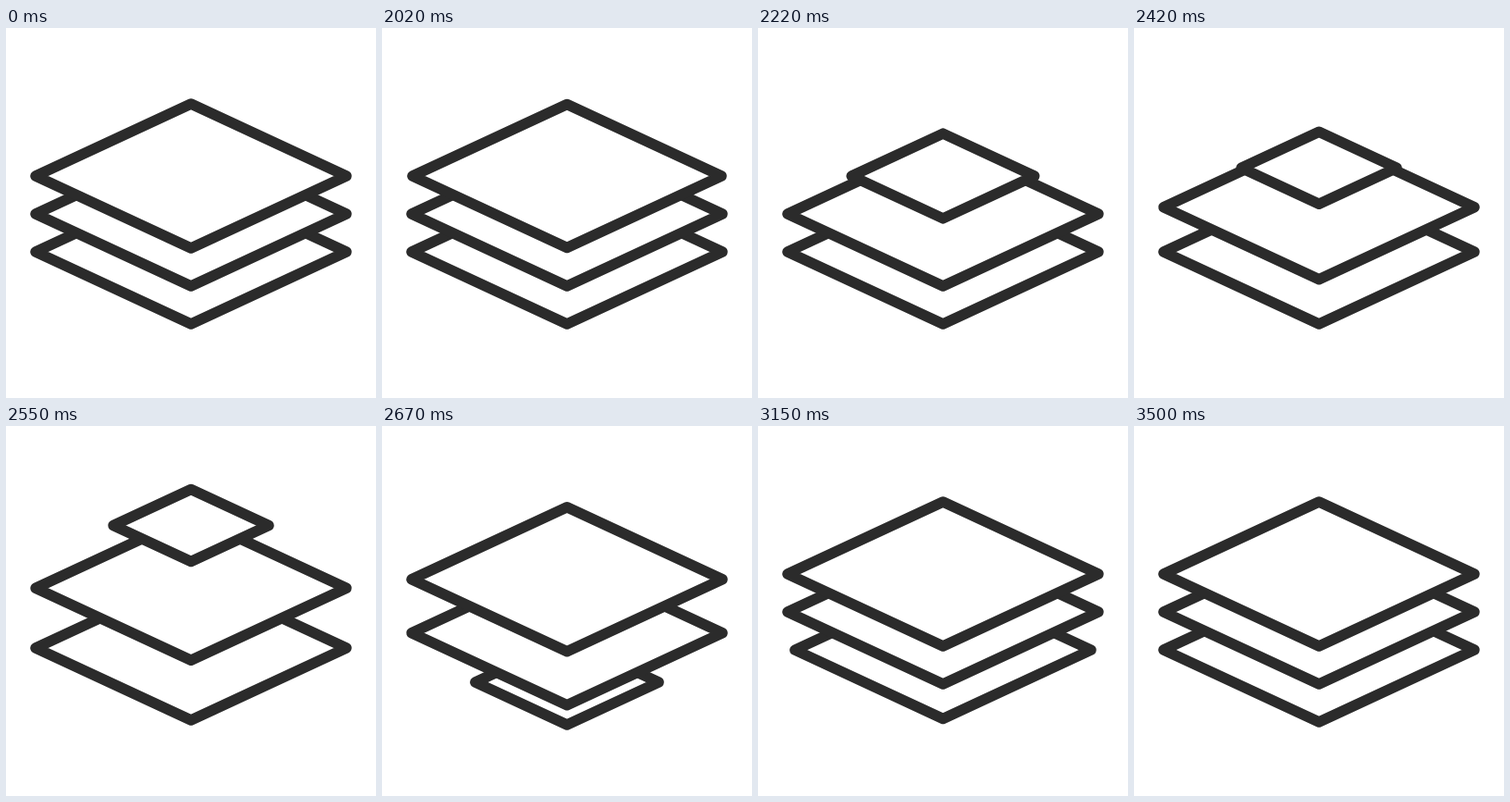
Animation, 400 px wide and 400 px high, one loop 3520 ms. Source, as an HTML page with a canvas:

```html
<!DOCTYPE html>
<html lang="en">
<head>
<meta charset="utf-8">
<title>Layers</title>
<style>
  html, body { margin: 0; width: 100%; height: 100%; overflow: hidden; background: #fff; }
  canvas { display: block; width: 400px; height: 400px; }
</style>
</head>
<body>
<canvas id="stage" width="400" height="400"></canvas>
<script>
const ctx = document.getElementById('stage').getContext('2d');

const LOOP = 3520;
const HALF_W = 168, HALF_H = 78;
const TOP = 160, MIDDLE = 201, BOTTOM = 242;
const SMALL = 0.5;      // scale of a sheet while it changes place
const SWAP = 2560;      // moment the lifted sheet goes to the back

const mix = (a, b, p) => a + (b - a) * p;
const bezier = (a, b, u) => 3 * a * u * (1 - u) ** 2 + 3 * b * u * u * (1 - u) + u ** 3;

// cubic-bezier(.25, .1, .25, 1)
function ease(x) {
  if (x <= 0) return 0;
  if (x >= 1) return 1;
  let lo = 0, hi = 1;
  for (let i = 0; i < 24; i++) {
    const mid = (lo + hi) / 2;
    if (bezier(0.25, 0.25, mid) < x) lo = mid; else hi = mid;
  }
  return bezier(0.1, 1, lo);
}

const tween = (t, start, length, from, to) => mix(from, to, ease((t - start) / length));

function sheet(y, scale = 1) {
  const w = HALF_W * scale, h = HALF_H * scale;
  ctx.beginPath();
  ctx.moveTo(200, y - h);
  ctx.lineTo(200 + w, y);
  ctx.lineTo(200, y + h);
  ctx.lineTo(200 - w, y);
  ctx.closePath();
  ctx.fill();
  ctx.stroke();
}

function draw(t) {
  ctx.fillStyle = '#fff';
  ctx.fillRect(0, 0, 400, 400);
  ctx.strokeStyle = '#2b2b2b';
  ctx.lineWidth = 11.5;
  ctx.lineJoin = 'round';

  if (t >= SWAP) {
    sheet(tween(t, 2500, 700, BOTTOM + 58, BOTTOM), tween(t, 2525, 990, SMALL, 1));
  }
  sheet(tween(t, 2511, 600, BOTTOM, MIDDLE));
  sheet(tween(t, 2333, 600, MIDDLE, TOP));
  if (t < SWAP) {
    const lift = 52 * (Math.max(0, t - 2332) / 218) ** 2;
    sheet(TOP - lift, tween(t, 2012, 400, 1, SMALL));
  }
}

function frame() {
  draw(performance.now() % LOOP);
  requestAnimationFrame(frame);
}
frame();
</script>
</body>
</html>
```
